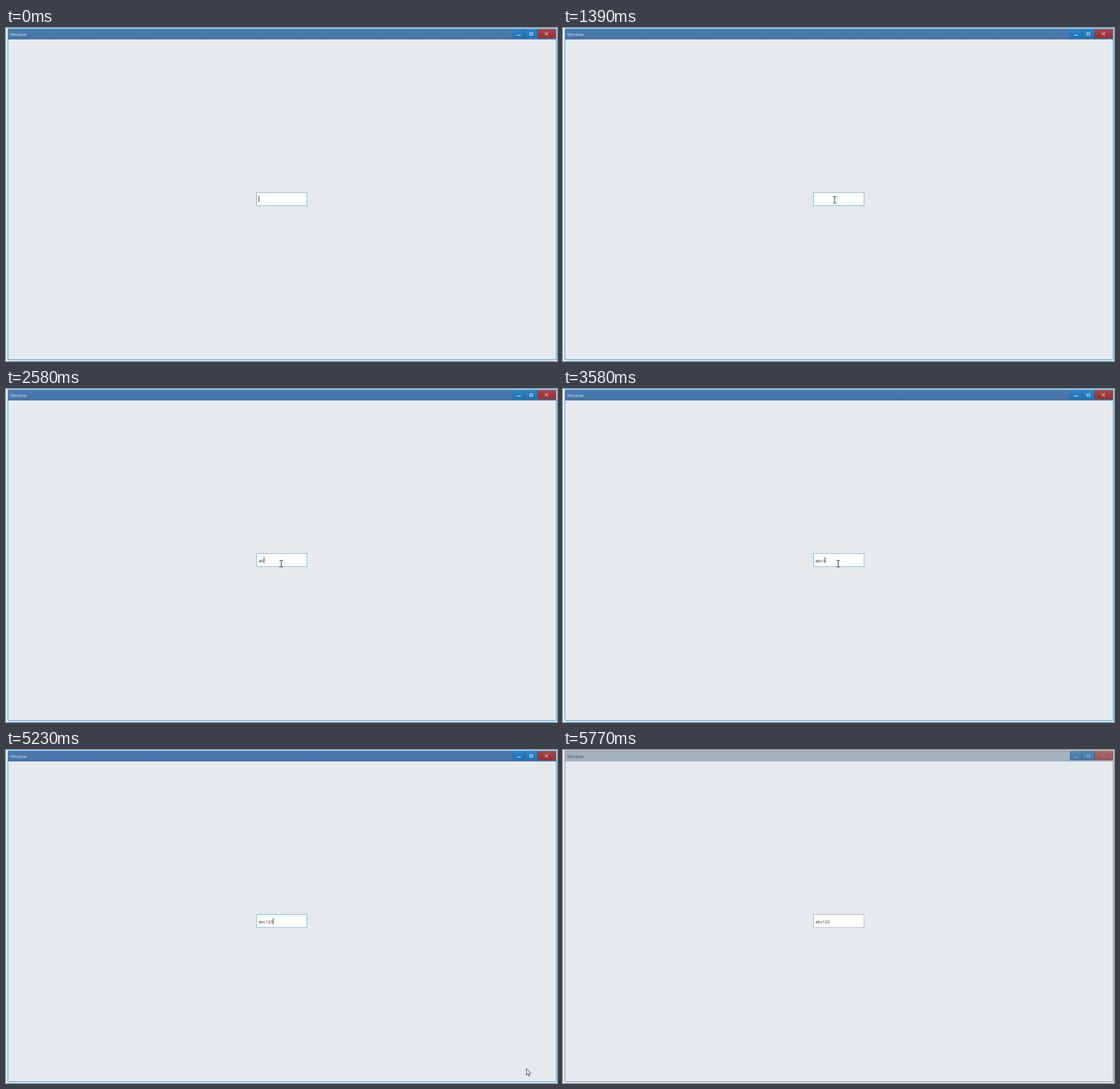
Write an HTML page that moves like this. It is 962x582 px and loops after 5.85 s.

```html
<!DOCTYPE html>
<html lang="en">
<head>
<meta charset="utf-8">
<title>Text input</title>
<style>
  html, body { margin: 0; width: 100%; height: 100%; overflow: hidden; background: #fff; }
  #stage { position: relative; width: 962px; height: 582px; overflow: hidden;
    font: 7.5px/10px "Open Sans", "Noto Sans", sans-serif; }
  #stage div, #stage svg { position: absolute; box-sizing: border-box; }
  .window { left: 3px; top: 1px; width: 958px; height: 579px;
    background: #e6eaed; border: 1px solid #4ba3e3; box-shadow: 0 0 3px #58b0ee; }
  .bar { left: 4px; top: 2px; width: 956px; height: 18px;
    background: linear-gradient(#4a7aae, #4873a7); }
  .title { left: 7.5px; top: 6px; color: #e4ebf3; white-space: pre; }
  .button { top: 2px; height: 16px; border: 1px solid #2b6ca5; border-top: 0;
    background: linear-gradient(#2f86c6, #1c74b7); }
  .min { left: 885px; width: 21px; }
  .max { left: 906px; width: 22px; }
  .close { left: 928px; width: 32px; border-color: #8b3a40;
    background: linear-gradient(#a8474a, #962f33); }
  .glyphs { left: 885px; top: 2px; fill: none; stroke: #f2f6fa; }
  .field { left: 437px; top: 287px; width: 89px; height: 24px;
    background: #fff; border: 1px solid #71b9ee; }
  #text { left: 440.7px; top: 295px; color: #262626; white-space: pre; }
  #caret { top: 294px; width: 1px; height: 10px; background: #222; }
  #arrow, #beam { left: 0; top: 0; overflow: visible; }
  .hint { left: 945px; top: 580px; width: 13px; height: 2px; background: #f7f3c4; display: none; }

  .inactive .window { border-color: #8d9296; box-shadow: 0 0 3px #a2a5a8; }
  .inactive .bar { background: #a2b1c0; }
  .inactive .title { color: #454a50; }
  .inactive .button { background: linear-gradient(#5089b5, #437ba8); border-color: #41698a; }
  .inactive .close { background: linear-gradient(#a86869, #9b5657); border-color: #8b5558; }
  .inactive .glyphs { stroke: #94b3ca; }
  .inactive .glyphs .x { stroke: #b77f80; }
  .inactive .field { border-color: #abb6c0; }
  .inactive .hint { display: block; }
</style>
</head>
<body>
<div id="stage">
  <div class="window"></div>
  <div class="bar"></div>
  <div class="title">Window</div>
  <div class="button min"></div>
  <div class="button max"></div>
  <div class="button close"></div>
  <svg class="glyphs" width="75" height="16">
    <path d="M7 10.5h7M29.5 6.5h5v4h-5z"/>
    <path class="x" d="M55.5 5.5l6 5.5M61.5 5.5l-6 5.5"/>
  </svg>
  <div class="field"></div>
  <div id="text"></div>
  <div id="caret"></div>
  <svg id="beam" width="8" height="13">
    <path d="M.5 .5h2.5l.5.5.5-.5h2.5M3.5 1v10.5M.5 12h2.5l.5-.5.5.5h2.5" fill="none" stroke="#222"/>
  </svg>
  <svg id="arrow" width="9" height="15">
    <path d="M.5 .6V12.2L3.1 9.8L4.8 13.6L6.5 12.9L4.9 9H8.3Z" fill="#fff" stroke="#222" stroke-width=".9"/>
  </svg>
  <div class="hint"></div>
</div>
<script>
  const LOOP = 5850;
  const byId = id => document.getElementById(id);
  const stage = byId('stage'), text = byId('text'), caret = byId('caret');
  const pointers = { arrow: byId('arrow'), beam: byId('beam') };

  // [time, letters typed, caret x or null]
  const typing = [
    [0, 0, 441], [70, 0, null], [630, 0, 441], [1160, 0, null], [1550, 0, 441],
    [1870, 1, 444], [2580, 2, 450], [2980, 3, 453], [3580, 4, 457],
    [3820, 5, 461], [4130, 6, 466], [4670, 6, null], [5230, 6, 466], [5770, 6, null]
  ];

  // [time, pointer, x, y]
  const moves = [
    [0, ''], [480, 'arrow', 867, 469], [550, 'arrow', 690, 414], [630, 'arrow', 554, 371],
    [860, 'arrow', 523, 341], [940, 'arrow', 494, 314], [1010, 'beam', 487, 298],
    [1090, 'beam', 482, 297], [1160, 'beam', 479, 296], [1240, 'beam', 476, 295],
    [1310, 'beam', 473, 295], [1390, 'beam', 471, 294], [1460, 'beam', 470, 294],
    [1550, 'beam', 469, 294], [1710, 'beam', 477, 299],
    [4670, 'arrow', 525, 324], [4750, 'arrow', 640, 394], [4820, 'arrow', 785, 482],
    [4900, 'arrow', 895, 547], [5230, 'arrow', 908, 556], [5310, 'arrow', 919, 563],
    [5390, 'arrow', 928, 570], [5460, 'arrow', 934, 576], [5540, '']
  ];

  const stepAt = (steps, t) => steps.findLast(s => s[0] <= t);

  function draw(t) {
    const [, count, caretX] = stepAt(typing, t);
    text.textContent = 'abc123'.slice(0, count);
    caret.style.visibility = caretX === null ? 'hidden' : 'visible';
    if (caretX !== null) caret.style.left = caretX + 'px';

    const [, shape, x, y] = stepAt(moves, t);
    for (const name in pointers) {
      const style = pointers[name].style;
      style.visibility = name === shape ? 'visible' : 'hidden';
      if (name === shape) style.transform = `translate(${x}px, ${y}px)`;
    }
    stage.classList.toggle('inactive', t >= 5770);
  }

  const start = performance.now();
  function tick() {
    draw((performance.now() - start) % LOOP);
    requestAnimationFrame(tick);
  }
  tick();
</script>
</body>
</html>
```
